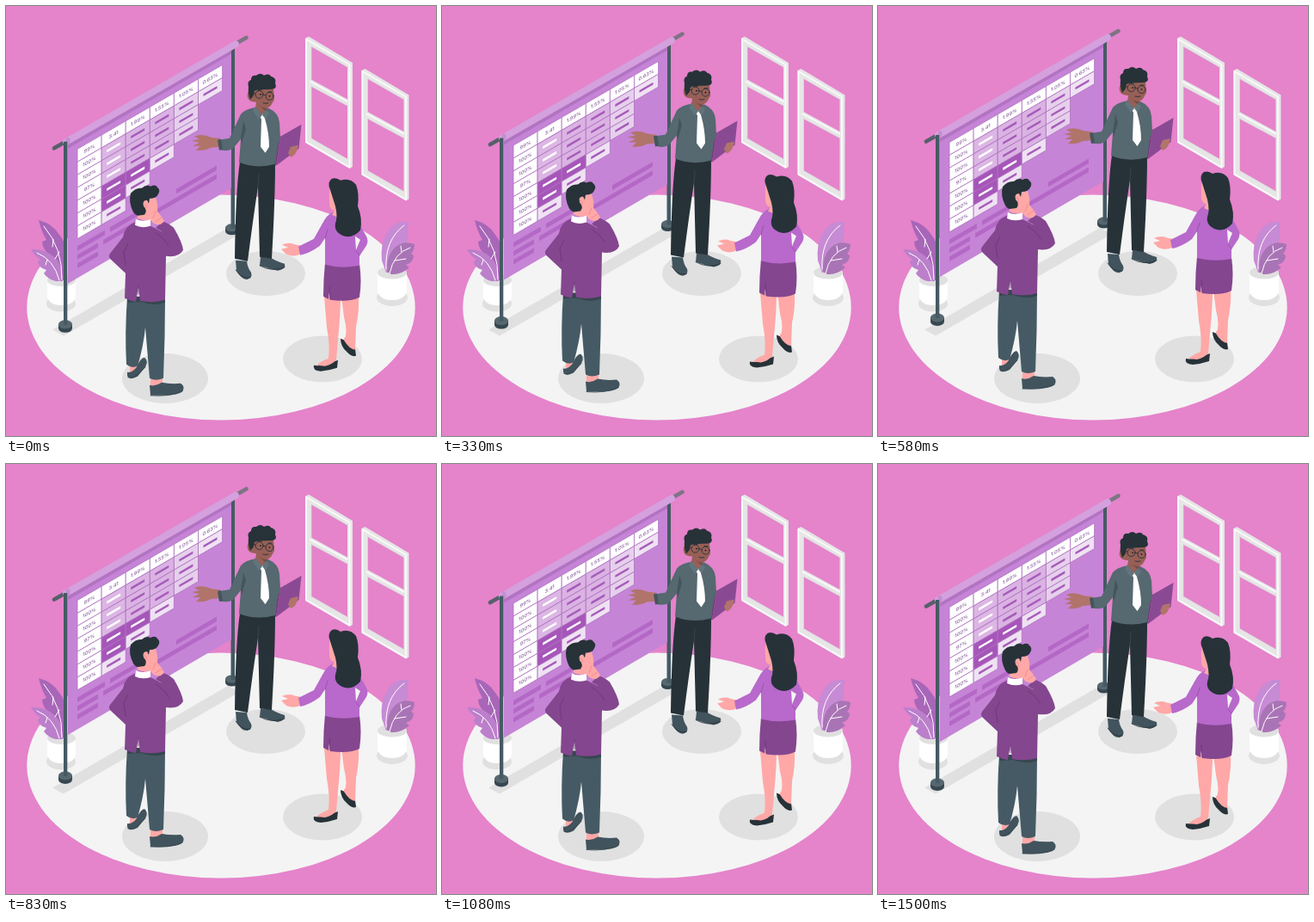
These frames come from a looping animation (500 px wide and 500 px high, 1540 ms). An HTML page:

```html
<!DOCTYPE html>
<html lang="en">
<head>
<meta charset="utf-8">
<title>Presentation</title>
<style>
html, body { margin: 0; width: 100%; height: 100%; overflow: hidden; background: #e583cb; }
svg { display: block; width: 100%; height: 100%; }
text { font: 500 5.7px Inter, sans-serif; fill: #85599a; text-anchor: middle; }
.skin { fill: #ffa8a7; } .brown { fill: #975f56; } .palm { fill: #b1746a; } .hair { fill: #263238; }
.shoe { fill: #41535d; } .steel { fill: #455a64; } .plum { fill: #84468f; }
.line { fill: none; stroke-linecap: round; stroke-linejoin: round; }
</style>
</head>
<body>
<svg viewBox="0 0 500 500">
<defs>
  <g id="window">
    <path fill="#e6e6e6" fill-rule="evenodd" d="M348 37.5L352 35.5 403 66V187L399.5 189 348 159ZM355 47V85.500L397 108.500V71ZM355 93.500V154L397 178V116Z"/>
    <path class="line" stroke="#fafafa" stroke-width="1.8" d="M349 38.500L399.500 68V187.500L349 158ZM354 88L397 111"/>
    <path class="line" stroke="#d8d8d8" stroke-width=".8" d="M355 85.500V47L397 71M355 154V93.500L397 116M355 154L397 178"/>
  </g>
</defs>

<rect width="500" height="500" fill="#e583cb"/>
<ellipse cx="250" cy="350.500" rx="225.700" ry="131" fill="#f4f4f4"/>
<use href="#window"/><use href="#window" x="65.5" y="37.5"/>
<g fill="#e0e0e0">
  <ellipse cx="302" cy="311" rx="46" ry="26"/><ellipse cx="185" cy="433" rx="50" ry="29"/>
  <ellipse cx="368" cy="410.500" rx="46" ry="27"/>
  <ellipse cx="64" cy="346" rx="17" ry="9.500"/><ellipse cx="449" cy="339" rx="18" ry="10"/>
  <path d="M54 376.500L67 383.500 272 265 258 258Z"/>
</g>

<g id="plants">
  <path fill="#fff" d="M48 319V339Q51 348 64.500 348T81 339V319Z"/><ellipse cx="64.500" cy="319" rx="16.500" ry="7" fill="#e0e0e0"/>
  <path fill="#a866b8" d="M38 249Q54 253 62 266 73 279 70 300L67 319 61 318Q57 302 47 294L52 290Q42 283 42 274L47 272Q41 262 38 249Z"/>
  <path fill="#bc7fcb" d="M29 283Q45 282 55 291 66 299 66 320L58 320Q49 318 44 311L47 307Q37 304 37 297L40 295Q34 291 29 283Z"/>
  <path class="line" stroke="#fff" stroke-width="1" d="M44 256Q66 282 65 318M55 271L54 280M62 286L57 294M36 287Q56 295 62 319M48 295L46 301"/>
  <path fill="#fff" d="M432 310V333Q436 342 449 342T466 333V310Z"/><ellipse cx="449" cy="310" rx="17" ry="7.500" fill="#e0e0e0"/>
  <path fill="#c68bd4" d="M468 251Q451 249 443 264 435 277 437 296L442 310 450 309Q456 298 452 286L461 282Q469 274 467 262Z"/>
  <path fill="#a974b5" d="M475 277Q462 272 452 281 442 291 443 309L448 312Q459 313 469 304L465 301Q474 298 474 290L471 288Q475 284 475 277Z"/>
  <path class="line" stroke="#fff" stroke-width="1" d="M463 255Q440 272 442 306M470 281Q451 287 446 311M460 286L459 279M452 296L465 294"/>
</g>

<g id="float">
  <g id="board">
    <path fill="#37474f" d="M255 258V262A7.500 4.500 0 0 0 270 262V258Z"/>
    <ellipse cx="262.500" cy="258" rx="7.500" ry="4.500" fill="#56676f"/>
    <path class="steel" d="M261.500 48H266V259H261.500Z"/>
    <g class="line" stroke-width="4.600">
      <path stroke="#55606a" d="M56 165.500L80 152"/><path stroke="#7d7484" d="M255 51L279.500 37"/>
    </g>
    <path fill="#c684d6" d="M72 160L262 50V212L72 323Z"/>
    <path fill="#b273c2" d="M72 160L262 50V56L72 166Z"/>
    <g id="table" transform="matrix(1 -.58 0 1 83 166.500)"></g>
    <path class="line" stroke="#d4a0dd" stroke-width="8" stroke-linecap="butt" d="M70 158L267 44.500"/>
    <ellipse cx="72" cy="157" rx="2.500" ry="4" fill="#c48dd0"/>
    <path fill="#37474f" d="M61 370V375A8 5 0 0 0 77 375V370Z"/>
    <ellipse cx="69" cy="370.500" rx="8" ry="5" fill="#56676f"/>
    <path class="steel" d="M67 158H71.300V371H67Z"/>
  </g>

  <g id="speaker">
    <path class="shoe" d="M267 296L280 297Q281 305 285 310 287 316 281 318 274 319 268 308ZM296 292L308 293Q314 297 324 300 326 306 316 308 306 306 295 302Z"/>
    <path class="line" stroke="#263238" stroke-width=".8" d="M267 307Q274 318 284 316M295 302Q309 310 324 304"/>
    <path fill="#263238" d="M272 181L313 182Q313 225 309 294L295 292 293 210Q287 250 281 297L266 294Q267 215 272 181Z"/>
    <path class="line" stroke="#3d4a50" stroke-width=".8" d="M294 196L293 212"/>
    <path fill="#8a4a93" d="M319 152L343.500 138 340.500 166 314 186Z"/>
    <path fill="#6f3979" d="M319 152L317 152 312.500 184 314 186Z"/>
    <path class="palm" d="M340 162Q338 174 331 176L328 171 331 164Z"/>
    <path class="palm" d="M249 154Q239 154 233 151 224 149 219 152L225 155 216 157 225 159 217 163 226 163 221 168Q231 169 238 165L250 164Z"/>
    <path fill="#566870" d="M291 118L305 119Q317 124 318 136L319 154 316 163 313 184Q291 190 271 182L273 155 264 166Q257 170 248 167L247 156 260 154 273 126Q278 120 291 118Z"/>
    <path fill="#45555d" d="M246 156L250 155 252 167 248 168ZM276 134L273 155 274 160 279 143Z"/>
    <path fill="#fff" d="M294 126L299.500 126 301 131Q306 148 306 164L301.500 171 296 164 297 132Z"/>
    <path class="brown" d="M285 96Q300 89 311 96L312 109 308 116 304 119 302 119 302 123 297 127 290 119 291 112Q279 112 281 101Z"/>
    <path fill="#7a4a43" d="M292 113Q297 119 303 119L302 123Z"/>
    <path fill="#62747c" d="M290 117L287 122 294 132 298 127ZM302 121L306 125 302 132 298 127Z"/>
    <path class="hair" d="M284 109Q281 101 282 94 280 88 285 86 285 80 291 81 296 77 300 81 306 78 308 82 315 84 313 90 316 96 309 97 300 97 291 98 288 98 288 104Z"/>
    <g class="line" stroke="#263238" stroke-width=".9">
      <circle cx="294.500" cy="103" r="4.500"/><circle cx="306.500" cy="105" r="4.500"/>
      <path d="M299 103L302 104M285 101L290 102M299 113Q302 114 305 113M293 98L297 98M305 100L309 100"/>
    </g>
    <circle cx="296" cy="103" r=".8"/><circle cx="306.500" cy="105" r=".8"/>
  </g>

  <g id="listener">
    <path class="skin" d="M144 412H154V426H144ZM168 430H182V444H168Z"/>
    <path class="shoe" d="M141 426Q147 427 152 420 156 410 161 409 166 413 162 420L153 431Q143 436 141 430ZM167 441Q174 443 181 438 191 440 203 439 208 442 206 447 204 452 186 453H168Z"/>
    <path class="line" stroke="#37474f" stroke-width=".8" d="M142 432Q150 434 162 420M168 453Q190 455 205 448"/>
    <path class="steel" d="M141 338L185 339Q185 385 183 433 174 437 167 433L162 374Q160 395 153 419 146 422 140 417 138 380 141 338Z"/>
    <path fill="#37474f" d="M141 338L185 338V345Q172 350 157 344L141 345Z"/>
    <path class="plum" d="M150 252Q138 256 136 269L121 288Q118 292 123 296L139 311 138 340Q144 343 151 344L154 327 156 343Q171 346 185 342L186 291Q201 293 206 284 205 275 195 258 188 252 182 251L174 258 182 263 166 255Z"/>
    <path class="line" stroke="#6b3676" stroke-width=".8" d="M137 286L139 301M137 286L142 276M174 264Q184 270 189 279M154 326V336"/>
    <path fill="#fff" d="M151 248Q159 252 168 248L168 256Q158 259 150 255Z"/>
    <path class="skin" d="M158 226L174 223Q177 231 176 239L180 244 184 250Q180 257 172 253L167 248Q160 251 153 247L153 238Z"/>
    <path class="line" stroke="#ec8589" stroke-width=".8" d="M174 239L171 247M181 246L174 251M160 231Q164 230 163 235"/>
    <path class="hair" d="M148 240Q142 228 145 218 151 211 158 212 163 207 168 210 174 207 176 211 180 214 177 219 175 224 167 224L166 230 164 226Q158 226 160 233 165 238 161 243L153 244Q150 243 148 240Z"/>
  </g>

  <g id="guest">
    <path class="skin" d="M370 338H389Q389 360 386 388L384 412 375 419 361 421 375 410Q377 395 373 374ZM390 338H410Q411 355 407 373L406 400 402 400 393 389Q398 380 393 362Z"/>
    <path class="hair" d="M358 418Q364 419 373 417L386 412 385 421Q376 424 366 425 356 424 358 418ZM389 387L394 389Q398 397 406 399L407 407Q402 409 396 402 389 396 389 387Z"/>
    <path class="skin" d="M361 418Q370 411 376 410L384 411Q380 417 371 419ZM393 386L403 388 406 400Q399 399 393 389Z"/>
    <path class="plum" d="M371 299L411 300Q414 320 411 339 400 345 377 342L376 333 375 341 369 338Q369 318 371 299Z"/>
    <path class="line" stroke="#6b3676" stroke-width=".8" d="M377 341L376 327"/>
    <path class="skin" d="M344 279Q336 278 331 276 324 276 321 278L328 281 320 283 326 289Q335 293 344 288Z"/>
    <path fill="#b869cb" d="M380 240L390 237Q406 240 409 250L419 268Q422 273 419 279L411 291V302Q390 306 371 301L371 270 365 279Q353 288 342 290L340 280 358 271 368 253Q373 243 380 240Z"/>
    <path fill="#f4f4f4" d="M406 268L412 272 407 284Z"/>
    <path class="line" stroke="#944ba8" stroke-width=".8" d="M371 270L374 260M411 290L407 285"/>
    <path class="skin" d="M377 209Q375 219 376 230 376 237 382 238L379 243 388 247 393 226 387 207Z"/>
    <path class="hair" d="M377 214Q373 205 379 201 384 199 389 203 400 199 407 208 411 218 409 233 415 248 412 261 404 270 394 268 381 264 383 253 386 246 383 233 385 220Z"/>
  </g>
</g>
</svg>
<script>
const table = document.getElementById('table');
const float = document.getElementById('float');
const W = 28.1, H = 14.9, LOOP = 1540, PEAK = 708, RISE = 8.5;

function add(name, attrs, content = '') {
  const el = document.createElementNS('http://www.w3.org/2000/svg', name);
  for (const key in attrs) el.setAttribute(key, attrs[key]);
  el.textContent = content;
  table.append(el);
}

function cell(col, row, fill) {
  add('rect', { x: col * W, y: row * H, width: W, height: H, fill, stroke: '#b072c0', 'stroke-width': .7 });
}

function bar(x, y, width, height, fill) {
  add('rect', { x, y, width, height, fill });
}

function label(col, row, value) {
  cell(col, row, '#fff');
  add('text', { x: (col + .5) * W, y: row * H + 9.6 }, value);
}

['99%', '3.41', '1.99%', '1.55%', '1.05%', '0.63%'].forEach((value, col) => label(col, 0, value));
['100%', '100%', '97%', '100%', '100%', '100%'].forEach((value, i) => label(0, i + 1, value));

// One letter per cell below the header: light, mid, soft, dark, pale
const fills = { l: '#dcb6e4', m: '#dab3e3', s: '#e6d0ec', d: '#a656b9', p: '#efe2f3' };
['lllddp', 'mmmdp', 'mmmp', 'sss', 'p'].forEach((column, i) => {
  [...column].forEach((kind, j) => {
    cell(i + 1, j + 1, fills[kind]);
    bar((i + 1) * W + 6, (j + 1) * H + 6, 16, 2.8, 'ld'.includes(kind) ? '#fff' : '#a75bba');
  });
});

for (const [x, y, width] of [[0, 113, 32], [38, 113, 40], [0, 123, 24], [30, 123, 48],
  [0, 133, 24], [115, 113, 47], [87, 123, 75]]) bar(x, y, width, 5.5, '#b468c6');

function draw(now) {
  const phase = (now % LOOP - PEAK) / LOOP * 2 * Math.PI;
  float.setAttribute('transform', `translate(0 ${-RISE * (1 + Math.cos(phase)) / 2})`);
}

const start = performance.now();
function tick() {
  draw(performance.now() - start);
  requestAnimationFrame(tick);
}
tick();
</script>
</body>
</html>
```
